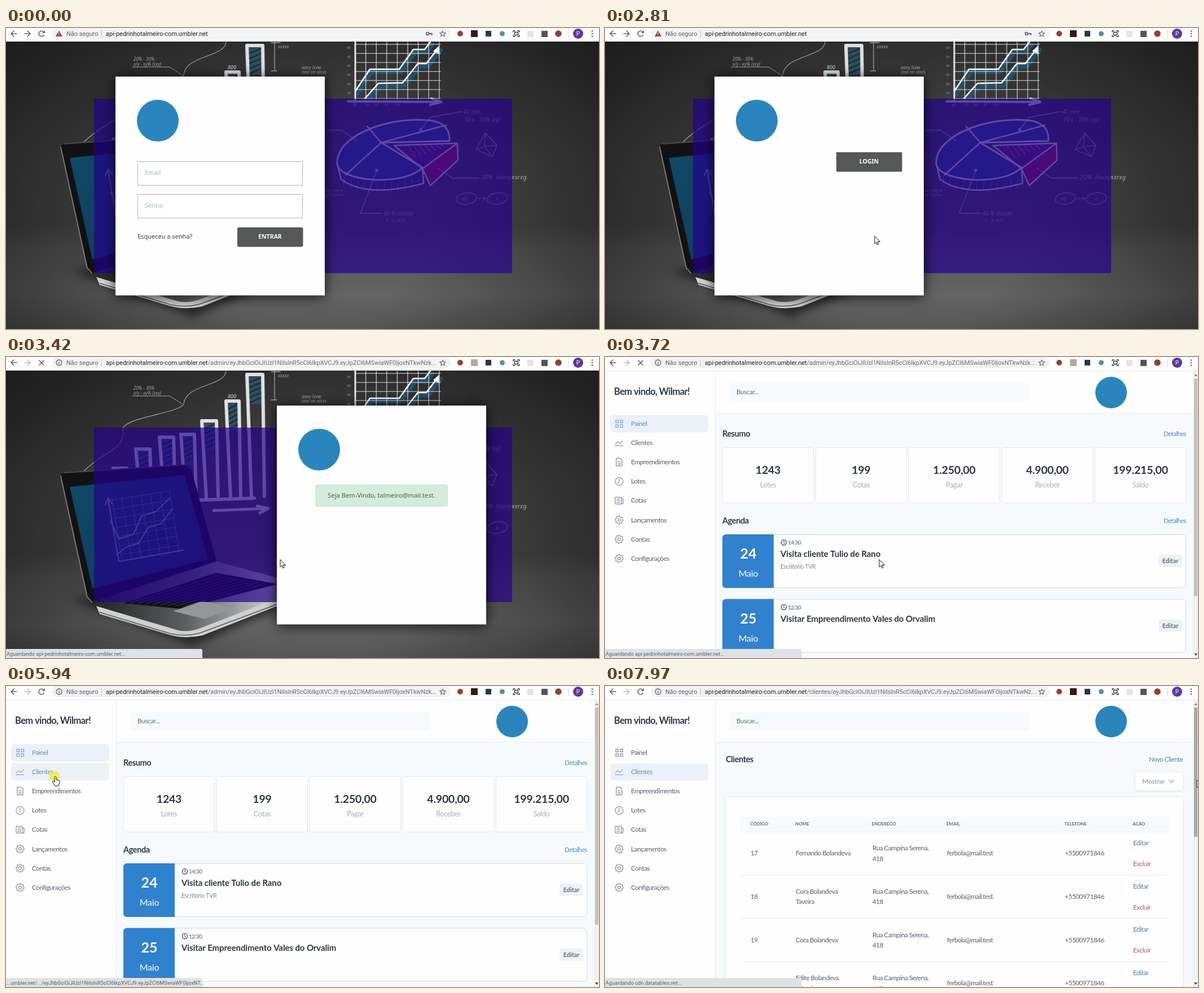
An HTML page with a canvas that plays this animation: 1051 by 533 pixels, repeating every 8 s.

```html
<!DOCTYPE html>
<html lang="pt-BR">
<head>
<meta charset="utf-8">
<title>Painel</title>
<style>
html, body { margin: 0; width: 100%; height: 100%; overflow: hidden; background: #fff; }
canvas { display: block; width: 100vw; height: 100vh; }
</style>
</head>
<body>
<canvas id="stage" width="1051" height="533"></canvas>
<script>
const W = 1051, H = 533, LOOP = 8000;
const stage = document.getElementById('stage').getContext('2d');
let g = stage;

const UI = 'Roboto, sans-serif', FORM = '"Noto Sans", sans-serif', DASH = 'Lato, sans-serif';
const BLUE = '#2a85bd', DARK = '#2d3748';
const HOST = 'api-pedrinhotalmeiro-com.umbler.net';
const MAIL = 'talmeiro@mail.test';
const TOKEN = 'eyJhbGciOiJIUzI1NiIsInR5cCI6IkpXVCJ9.eyJpZCI6MSwiaWF0IjoxNTkwNz';

// ---------- helpers ----------
function text(s, x, y, font, color, align = 'left', spacing = 0) {
  g.font = font;
  g.fillStyle = color;
  g.textAlign = align;
  g.letterSpacing = spacing + 'px';
  g.fillText(s, x, y);
}
const dash = (s, x, y, size, color, align, spacing = -0.5) =>
  text(s, x, y, `${size}px ${DASH}`, color, align, spacing);
const bold = (s, x, y, size, color, align, spacing = -0.4) =>
  text(s, x, y, `bold ${size}px ${DASH}`, color, align, spacing);

function rect(x, y, w, h, color) {
  g.fillStyle = color;
  g.fillRect(x, y, w, h);
}
function box(x, y, w, h, r, fill, line) {
  g.beginPath();
  g.roundRect(x, y, w, h, r);
  if (fill) { g.fillStyle = fill; g.fill(); }
  if (line) { g.strokeStyle = line; g.lineWidth = 1; g.stroke(); }
}
function dot(x, y, r, color) {
  g.beginPath();
  g.arc(x, y, r, 0, 7);
  g.fillStyle = color;
  g.fill();
}
function ring(x, y, r, color, width = 1) {
  g.beginPath();
  g.arc(x, y, r, 0, 7);
  g.strokeStyle = color;
  g.lineWidth = width;
  g.stroke();
}
function line(d, color, width = 1, x = 0, y = 0) {
  g.save();
  g.translate(x, y);
  g.strokeStyle = color;
  g.lineWidth = width;
  g.lineCap = g.lineJoin = 'round';
  g.stroke(new Path2D(d));
  g.restore();
}
function shape(d, color, x = 0, y = 0) {
  g.save();
  g.translate(x, y);
  g.fillStyle = color;
  g.fill(new Path2D(d));
  g.restore();
}
function shadow(color, blur, dy = 0) {
  g.shadowColor = color;
  g.shadowBlur = blur;
  g.shadowOffsetY = dy;
}
const noShadow = () => shadow('transparent', 0);
const within = (t, a, b) => t >= a && t < b;
function blend(gradient, ...stops) {
  stops.forEach(([p, c]) => gradient.addColorStop(p, c));
  return gradient;
}

// ---------- login backdrop ----------
function drawBackdrop() {
  rect(0, 24, W, H, blend(g.createLinearGradient(0, 24, 0, H),
    [0, '#353535'], [.4, '#454545'], [.64, '#474747'], [.72, '#565656'], [.88, '#646464'], [1, '#565656']));
  rect(0, 24, W, H, blend(g.createRadialGradient(540, 330, 200, 540, 330, 650),
    [0, 'rgba(0,0,0,0)'], [1, 'rgba(0,0,0,.5)']));

  const chalk = 'rgba(238,238,238,.92)', soft = 'rgba(225,225,225,.65)';
  const note = (s, x, y, size = 9) => text(s, x, y, `italic ${size}px ${FORM}`, soft);

  // bar drawing
  line('M390 25C388 52 318 48 315 83C308 100 210 106 207 128C210 168 180 160 137 203', soft, 1.2);
  line('M224 69H290L312 83', soft);
  note('20% - 30%', 226, 58, 8);
  note('x/y - xy% (xxy)', 226, 67, 8);
  for (const [x, y, w] of [[190, 197, 24], [230, 163, 25], [272, 142, 25], [310, 137, 24], [347, 113, 26], [390, 78, 23], [427, 31, 28]]) {
    shape(`M${x} ${y}h${w}l3 52h-${w}z`, 'rgba(45,95,115,.65)');
    for (let i = 0; i < 5; i++) line(`M${x + 4} ${y + 14 + i * 9}l${w - 6} -9`, 'rgba(10,25,35,.7)', 2);
    line(`M${x + 8} 249L${x} ${y}h${w}L${x + w + 3} 247`, chalk, 6);
  }
  text('800', 393, 73, `italic 9px ${FORM}`, chalk);
  line('M205 258L440 250', chalk, 6);
  line('M368 272L464 268M445 264L465 268L450 276', chalk, 5);
  line('M476 25V76M470 26H486M470 76H480', soft, 1.3);
  note('xxxxx', 482, 36, 8);
  note('aaxy lxxw', 524, 73, 8);
  note('xxw nn xixxs', 524, 81, 8);

  // grid drawing
  const up = 'M619 112L645 73L697 73L722 38L742 38L752 25';
  const low = 'M636 125L660 98L703 97L730 63L745 63L767 34';
  line(up, 'rgba(30,90,125,.75)', 8, 3, 5);
  line(low, 'rgba(30,90,125,.75)', 8, 3, 5);
  for (let i = 0; i < 9; i++) line(`M${619 + i * 18.6} 25V127`, chalk, 1.1);
  for (let i = 0; i < 7; i++) line(`M618 ${29 + i * 16}H770`, chalk, 1.1);
  line(up, '#fff', 2.6);
  line(low, '#fff', 2.6);
  shape('M768 31L757 41L768 46Z', '#fff');
  line('M606 130L770 131M754 125L772 131L752 136', chalk, 4);
  line('M619 25V128', chalk, 3);
  for (let i = 0; i < 6; i++) note(60 - i * 10 + '', 604, 37 + i * 16, 6);
  text('0', 616, 139, `italic 8px ${FORM}`, chalk);
  [20, 60, 80, 120].forEach((n, i) => note(n + '', 637 + i * 17, 138, 6));

  // pie drawing
  shape('M587 238C588 185 690 155 755 164C778 168 787 182 786 200L665 203L738 247C705 282 584 272 587 238Z', '#2b4c82');
  shape('M588 246Q600 275 660 272T738 247L740 275Q690 293 640 288Q595 280 588 246Z', '#303f68');
  shape('M688 208L800 204L738 249Z', '#5c2c65');
  shape('M738 249L800 204L801 234L752 279Z', '#a01850');
  for (let i = 0; i < 7; i++) line(`M${712 + i * 10} 207l${14 - i} ${22 - i * 3}`, '#d46a92', 1.3);
  for (let i = 0; i < 12; i++) line(`M${600 + i * 12} ${262 + Math.sin(i / 4) * 9}l-2 18`, 'rgba(190,200,230,.4)');
  line('M587 238C588 185 690 155 755 164C778 168 787 182 786 200L665 203L738 247C705 282 584 272 587 238', chalk, 3);
  line('M587 240L594 268Q640 302 740 275L738 247M640 174L665 203L780 172M665 203L602 260', chalk, 2.5);
  line('M688 208L800 204L738 249ZM800 204L801 234L752 279L738 249', chalk, 2.5);
  line('M735 180L752 158L808 148M657 252L628 328H665M765 248L792 266H838M570 181H595L622 200', soft, 1.3);
  dot(657, 252, 3, soft);
  dot(735, 180, 3, soft);
  note('40 mm', 810, 152, 10);
  note('10 x - 30% (xy)', 812, 166, 10);
  note('20%  hxxxyxxrxg', 842, 268, 11);
  note('40 % mxxdx', 669, 332, 10);
  note('x - y zxxs', 673, 343, 9);
  note('nxx lxxy w', 566, 290, 7);
  note('xx lxxyxxw', 566, 298, 7);
  line('M850 186L870 208L862 228L833 215ZM850 186L848 210L862 228M833 215L848 210L870 208', soft, 1.2);
  for (const x of [816, 871]) line(`M${x - 18} 304a18 10 -8 1 1 36 -4a18 10 -8 1 1 -36 4`, soft, 1.2);
  line('M836 302H850M846 299L851 302L846 305', soft);
  note('x/y', 808, 305, 8);
  note('x', 868, 305, 8);

  // laptop
  g.filter = 'blur(8px)';
  shape('M120 430L330 512L520 430L350 380Z', 'rgba(0,0,0,.55)');
  g.filter = 'none';
  shape('M97 211Q97 206 104 205L318 191Q326 191 328 198L373 362L155 434Q146 436 144 425Z', '#111114');
  line('M97 211L144 425L152 434', '#777', 2);
  line('M103 205L318 191L327 198', '#4c4c4c', 2);
  shape('M113 230L316 209L358 358L153 410Z', blend(g.createLinearGradient(110, 220, 340, 390),
    [0, '#0e4a66'], [1, '#16325a']));
  line('M181 252L200 362L314 342M176 261L181 250L188 260M185 290L200 322L226 314L240 282L265 274L290 250M196 350L214 336L235 330L252 302L275 295L294 270', soft, 2);
  for (let i = 0; i < 7; i++) line(`M${188 + i * 17} ${250 - i * 2}l17 108M${186 + i * 3} ${254 + i * 16}l104 -17`, 'rgba(220,220,220,.4)');
  shape('M152 434L373 362L500 396L498 432L345 490Q315 497 290 489L164 450Z', blend(g.createLinearGradient(180, 430, 460, 450),
    [0, '#2a2b2d'], [.5, '#5c5e60'], [1, '#c4c5c6']));
  shape('M160 441L305 484Q325 488 345 480L500 420L498 434L348 493Q318 500 290 492L166 455Z', '#cfd0d0');
  line('M166 452L292 490Q320 496 346 488L480 438', '#56585a', 1.5);
  shape('M208 436L372 382L482 402L310 446Z', '#101114');
  for (let i = 0; i < 8; i++) line(`M${222 + i * 13} ${435 + i}L${376 + i * 12} ${387 + i * 2}`, '#3f4147');
  shape('M296 450L348 432L404 444L352 464Z', '#94979a');

  rect(156, 125, 741, 309, 'rgba(35,0,140,.68)');
}
const backdrop = document.createElement('canvas');
backdrop.width = W;
backdrop.height = H;
g = backdrop.getContext('2d');
drawBackdrop();
g = stage;

// ---------- login pages ----------
function card(x) {
  g.drawImage(backdrop, 0, 0);
  shadow('rgba(0,0,0,.8)', 22, 2);
  rect(x, 86, 371, 387.5, '#fefefe');
  noShadow();
  dot(x + 75, 164, 37, BLUE);
}
function button(label, y, r) {
  box(410, y, 116.5, 34.5, r, '#565858');
  text(label, 468, y + 20, `bold 10.5px ${FORM}`, '#fff', 'center');
}
function field(y, hint, value, focus) {
  box(233.5, y + .5, 292, 42, 0, value ? '#e8f0fe' : '#fff', focus ? '#999' : '#b4b4b4');
  text(value || hint, 246, y + 24, `11px ${FORM}`, value ? '#333' : '#a4b6c8');
}
function loginPage(t) {
  card(194);
  const filled = t >= 2010;
  field(236, 'Email', filled && MAIL, t >= 1370 && !filled);
  field(294, 'Senha', filled && '•••••');
  text('Esqueceu a senha?', 233, 373, `11px ${FORM}`, '#3c3c3c');
  button('ENTRAR', 353, 3);
  if (!within(t, 1450, 2010)) return;
  rect(245, 249, 1, 18, '#333');
  shadow('rgba(0,0,0,.4)', 4, 1);
  rect(232.5, 281, 294, 89, '#fff');
  noShadow();
  if (t >= 1770) rect(233, 281, 293, 56, '#eeeeee');
  dot(248, 309, 5, '#666');
  line('M245 307l3 1 1 3M249 306l2 1', '#fff', 1.4);
  text(MAIL, 264, 304, `10px ${UI}`, '#222');
  text('•••••', 264, 321, `10px ${UI}`, '#222', 'left', .6);
  rect(233, 338, 293, 1, '#dcdcdc');
  text('Gerenciar senhas...', 242, 358, `9.6px ${UI}`, '#222');
}
function retryPage() {
  card(194);
  button('LOGIN', 220, 1);
}
function welcomePage() {
  card(480);
  box(548.5, 226.5, 234, 38, 3, '#d4edda', '#c3e6cb');
  text(`Seja Bem-Vindo, ${MAIL}.`, 665.5, 249, `11.2px ${FORM}`, '#3f634b', 'center');
}

// ---------- dashboard ----------
const MENU = ['Painel', 'Clientes', 'Empreendimentos', 'Lotes', 'Cotas', 'Lançamentos', 'Contas', 'Configurações'];
const STEP = 34.1;
const menuAt = (x, y) => x > 9 && x < 183 && y > 103 ? Math.floor((y - 103) / STEP) : -1;

function menuIcon(i, y, color) {
  const at = d => line(d, color, 1.3, 25, y);
  if (i === 0) at('M-6-6h4.5v4.5h-4.5zM2-6h4.5v4.5h-4.5zM-6 2h4.5v4.5h-4.5zM2 2h4.5v4.5h-4.5z');
  else if (i === 1) at('M-7 2L-3-2L1 1L6-4M-7 5H7');
  else if (i === 2) at('M-5-7H2L5-4V7H-5ZM-2-1H2M-2 2H2M-2 4.5H2');
  else if (i === 3) { ring(25, y, 7, color, 1.3); at('M0-4V0L-2 3'); }
  else if (i === 4) at('M-7-6H4V6H-5Q-7 6-7 4ZM4-3H7V4Q7 6 4 6M-4-3H1M-4 0H1M-4 3H1');
  else {
    g.beginPath();
    for (let k = 0; k <= 32; k++) {
      const a = k * Math.PI / 16, r = k % 4 < 2 ? 7.3 : 5.6;
      g.lineTo(25 + Math.cos(a) * r, y + Math.sin(a) * r);
    }
    g.strokeStyle = color;
    g.lineWidth = 1.2;
    g.stroke();
    ring(25, y, 2.4, color, 1.2);
  }
}
function frame(active, hover) {
  rect(0, 24, W, H, '#f7fafc');
  rect(0, 24, 195, H, '#fefefe');
  rect(195, 24, 1, H, '#e6ebf1');
  rect(196, 24, 847, 75, '#fefefe');
  rect(196, 99, 847, 1, '#e6ebf1');
  rect(0, 24, W, 1, '#e4e5e7');
  bold('Bem vindo, Wilmar!', 16, 67, 16.5, DARK, 'left', -.6);
  box(220, 46, 532, 32, 5, '#f7fafc');
  dash('Buscar...', 233, 66, 11.5, '#5f6875', 'left', -.3);
  dot(897, 63, 28, BLUE);
  MENU.forEach((name, i) => {
    const y = 118 + i * STEP, on = i === active || i === hover;
    if (on) box(9, y - 15, 174, 30.5, 6, i === active ? '#ebf1f9' : '#edf2f7');
    menuIcon(i, y, on ? '#7eaede' : '#8a94a3');
    dash(name, 46, y + 4, 11.8, on ? '#5b8fc4' : '#566172');
  });
}
function scrollbar(h, color) {
  rect(1042, 24, 9, H, '#f1f1f1');
  rect(1044, 38, 6, h, color);
  shape('M1044 34h6l-3-4z', '#888');
  shape('M1044 525h6l-3 4z', '#444');
}
function event(y, day, time, title, place) {
  box(208.5, y + .5, 821, 94, 6, '#fefefe', '#cfd8e2');
  box(208, y, 91, 95, [6, 0, 0, 6], '#3182ce');
  bold(day, 254, y + 43, 25, '#fff', 'center', 0);
  dash('Maio', 254, y + 75, 16, '#fff', 'center', -.2);
  ring(317, y + 14.5, 4.6, DARK, 1.2);
  line(`M317 ${y + 12}v3l2 1`, DARK);
  dash(time, 324, y + 18, 10, '#4a5568');
  bold(title, 311, y + 40, 15, DARK, 'left', -.1);
  dash(place, 311, y + 61, 10.5, '#7b8696', 'left', -.3);
  box(981, y + 36, 42, 22, 4, '#edf2f7');
  bold('Editar', 1002, y + 51, 10.8, '#5f6b7c', 'center', 0);
}
function panelPage(t, hover) {
  frame(0, hover);
  const head = (s, y) => {
    bold(s, 208, y, 14.5, DARK);
    dash('Detalhes', 1030, y - 1, 11.5, '#4c8cc8', 'right', -.6);
  };
  head('Resumo', 141);
  [['1243', 'Lotes'], ['199', 'Cotas'], ['1.250,00', 'Pagar'], ['4.900,00', 'Receber'], ['199.215,00', 'Saldo']]
    .forEach(([value, label], i) => {
      const x = 208.5 + i * 165;
      box(x, 160.5, 161, 98, 3, '#fefefe', '#e2e8f0');
      bold(value, x + 80.5, 207, 19.5, DARK, 'center', -.2);
      dash(label, x + 80.5, 231, 13, '#a3b1c2', 'center', -.4);
    });
  head('Agenda', 295);
  event(314, '24', '14:30', 'Visita cliente Tulio de Rano', 'Escritório TVR');
  event(428.5, '25', '12:30', 'Visitar Empreendimento Vales do Orvalim', '');
  scrollbar(385, '#c1c1c1');
}
function clientsPage(t, hover) {
  frame(1, hover);
  bold('Clientes', 214, 135, 14.5, DARK);
  dash('Novo Cliente', 1024, 134, 11.5, '#4a7fb0', 'right');
  shadow('rgba(0,0,0,.13)', 4, 1);
  box(940, 153, 84, 32, 5, '#fff');
  box(214, 197, 810, 400, 4, '#fefefe');
  noShadow();
  bold('Mostrar', 952, 173, 12, '#a0aec0');
  line('M1000 167l4 4 4-4', '#a0aec0', 1.5);
  rect(239, 231, 760, 27, '#f7fafc');
  const cols = [257, 337, 473, 605, 814, 935];
  ['CÓDIGO', 'NOME', 'ENDEREÇO', 'EMAIL', 'TELEFONE', 'AÇÃO']
    .forEach((s, i) => bold(s, cols[i], 247, 8, '#5f6b7c', 'left', 0));
  [['Fernando Bolandeva'], ['Cora Bolandeva', 'Taveira'], ['Cora Bolandeva'], ['Edite Bolandeva', 'Talmeiro']]
    .forEach((name, i) => {
      const y = 296.3 + i * 76.7;
      const cell = (s, c, dy = 0, color = '#566172') => dash(s, cols[c] + 1, y + 4 + dy, 11.8, color);
      rect(239, Math.round(y - 38.5), 760, 1, '#eaeff4');
      cell(17 + i + '', 0);
      name.forEach((s, k) => cell(s, 1, name.length > 1 ? k * 18.5 - 9.2 : 0));
      cell('Rua Campina Serena,', 2, -9.2);
      cell('418', 2, 9.2);
      cell('ferbola@mail.test', 3);
      cell('+5500971846', 4);
      cell('Editar', 5, -18.5, '#4a7fb0');
      cell('Excluir', 5, 18.7, '#c05a50');
    });
  scrollbar(229, t >= 7900 ? '#a8a8a8' : '#c1c1c1');
}

// ---------- browser ----------
function toolbar(t, loading) {
  const inside = t >= 2880, grey = '#5f6368';
  rect(0, 0, W, 24, '#fff');
  line('M19 10H9M14 5L9 10L14 15', grey, 1.6);
  line('M33 10H43M38 5L43 10L38 15', inside ? '#b9bcc0' : grey, 1.6);
  if (loading) line('M59 6l8 8M67 6l-8 8', grey, 1.6);
  else {
    g.beginPath();
    g.arc(63, 10, 4.8, .4, 5.5);
    g.strokeStyle = grey;
    g.lineWidth = 1.6;
    g.stroke();
    shape('M69 4v5h-5z', grey);
  }
  box(81, 0, 707, 20, 10, '#f1f3f4');
  if (inside) {
    ring(94, 10, 5, grey, 1.3);
    line('M94 9.5V12.5M94 7.3V7.4', grey, 1.3);
  } else {
    shape('M94 4.5L100 15H88Z', '#a5432c');
    line('M94 8.5V11M94 13V13.1', '#fff', 1.1);
    ring(747, 10, 2.3, grey, 1.7);
    line('M750 10h5v2', grey, 1.8);
  }
  text('Não seguro', 107, 14, `11px ${UI}`, grey);
  rect(169, 4, 1, 13, '#c4c7cb');
  text(HOST, 177, 14, `11px ${UI}`, '#202124');
  if (inside) {
    const x = 177 + g.measureText(HOST).width;
    const path = t < 6190 ? `/admin/${TOKEN}k...` : `/clientes/${TOKEN}...`;
    text(path, x, 14, `11px ${UI}`, '#6b6f74', 'left', -.13);
  }
  g.beginPath();
  for (let k = 0; k <= 10; k++) {
    const a = k * Math.PI / 5 - Math.PI / 2, r = k % 2 ? 2.4 : 5.4;
    g.lineTo(774 + Math.cos(a) * r, 10.5 + Math.sin(a) * r);
  }
  g.strokeStyle = grey;
  g.lineWidth = 1.1;
  g.stroke();

  dot(805, 10, 5, '#9a3d2a');
  rect(824, 4, 12, 12, loading && !within(t, 6040, 6190) ? '#b9a79f' : '#3a1614');
  rect(850, 5, 10, 10, '#26384f');
  dot(879.5, 10, 4.5, '#4f93a8');
  line('M899 7V5h3M907 5h3v2M910 13v2h-3M902 15h-3v-2M901.5 7.5h6v5h-6z', '#333', 1.4);
  rect(924, 5, 11, 11, '#e3e4e5');
  rect(949, 5, 11, 11, '#555');
  dot(979, 10, 5.8, '#94402f');
  rect(996, 3, 1, 15, '#d5d7da');
  dot(1014, 10, 9, '#5a3a9c');
  text('P', 1014, 14, `10px ${UI}`, '#fff', 'center');
  for (const y of [5.5, 10, 14.5]) dot(1039, y, 1.3, grey);
}
function statusText(t) {
  if (within(t, 3030, 3800) || within(t, 6040, 7050)) return `Aguardando ${HOST}...`;
  if (within(t, 5940, 6040)) return '...umbler.net/.../' + TOKEN.slice(0, -4) + '...';
  return t >= 7050 ? 'Aguardando cdn.datatables.net...' : '';
}
function statusBar(s) {
  if (!s) return;
  box(-1, 517, 349, 17, [0, 3, 0, 0], '#dee1e6');
  text(s, 1, 529, `9.2px ${UI}`, '#5a5e63');
}

// ---------- pointer ----------
// start, end, steps, x, y
const MOVES = [
  [380, 990, 9, 350, 246], [1370, 1370, 1, 351, 254], [1620, 1850, 4, 350, 297],
  [2240, 2390, 3, 440, 358], [2560, 2720, 3, 478, 369], [3270, 3420, 3, 486, 359],
  [4180, 4260, 2, 354, 303], [4490, 4640, 3, 324, 280], [4870, 4870, 1, 319, 265],
  [4950, 5640, 10, 86, 159], [5720, 5790, 2, 87, 160], [7270, 7970, 10, 1049, 167]
];
const CLICKS = [[1370, 1450], [1930, 2010], [2560, 2640], [5940, 6040]];

function pointerAt(t) {
  let x = 1020, y = 528;
  for (const [t0, t1, n, tx, ty] of MOVES) {
    if (t < t0) break;
    const p = t >= t1 ? 1 : (Math.floor((t - t0) / (t1 - t0) * (n - 1)) + 1) / n;
    x += (tx - x) * p;
    y += (ty - y) * p;
  }
  return [x, y];
}
function pointerKind(t, x, y) {
  if (t < 2720) {
    const list = within(t, 1450, 2010) && y > 280;
    const inX = x > 233 && x < 526;
    if (inX && !list && ((y > 236 && y < 279) || (y > 294 && y < 338))) return 'beam';
    return x > 410 && x < 526 && y > 353 && y < 387 ? 'hand' : 'arrow';
  }
  return t >= 3720 && menuAt(x, y) >= 0 ? 'hand' : 'arrow';
}
function drawPointer(t, x, y) {
  if (t < 380) return;
  if (CLICKS.some(([a, b]) => within(t, a, b))) dot(x - 1, y, 9.5, 'rgba(240,236,60,.8)');
  const kind = pointerKind(t, x, y);
  if (kind === 'beam') {
    line('M-3-6.5H-1L0-6L1-6.5H3M0-6V6M-3 6.5H-1L0 6L1 6.5H3', '#111', 1.2, x, y);
    return;
  }
  const d = kind === 'hand'
    ? 'M-1 1Q0-1 2 1V6L7 7Q9 8 8 11L6 17H0L-5 10Q-4 8-1 10Z'
    : 'M0 0V13L3 10.3L5 15L7 14L5 9.5H9Z';
  shape(d, '#fff', x, y);
  line(d, '#111', 1, x, y);
}

// ---------- loop ----------
function draw(t) {
  const [x, y] = pointerAt(t);
  const loading = within(t, 2880, 3870) || within(t, 6040, 7500);
  if (t < 2720) loginPage(t);
  else if (t < 2880) retryPage();
  else if (t < 3720) welcomePage();
  else (t < 6490 ? panelPage : clientsPage)(t, menuAt(x, y));
  toolbar(t, loading);
  statusBar(statusText(t));
  drawPointer(t, x, y);
}
const start = performance.now();
function tick() {
  draw((performance.now() - start) % LOOP);
  requestAnimationFrame(tick);
}
tick();
</script>
</body>
</html>
```
